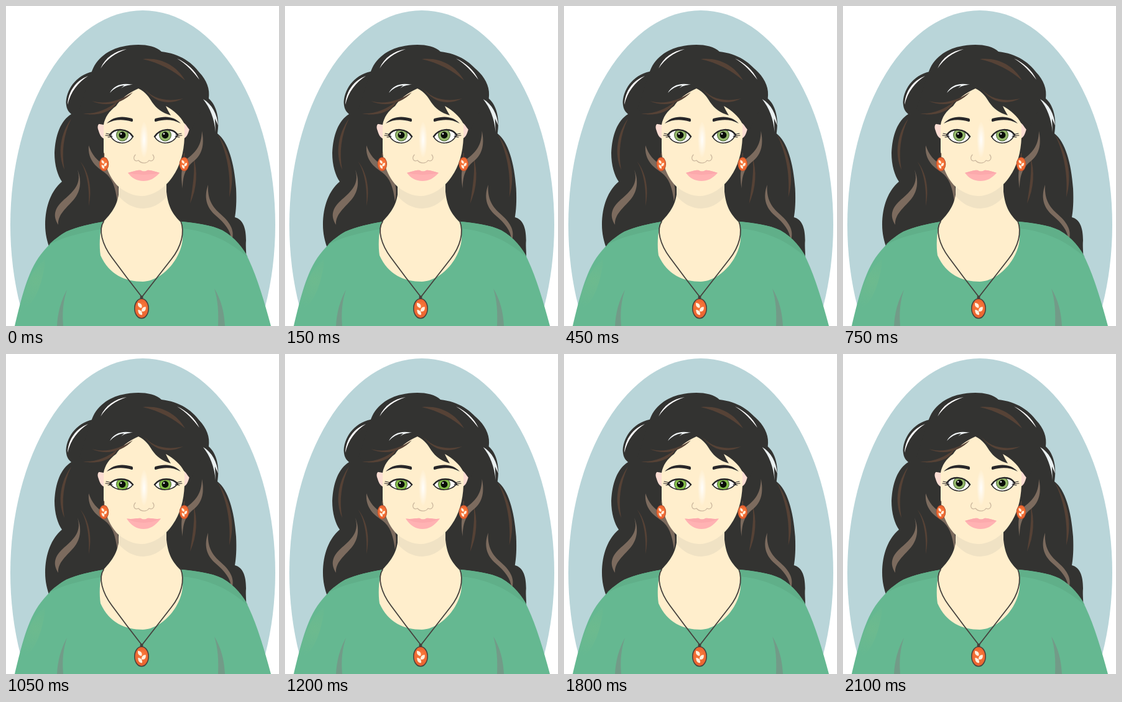
Write an HTML page with a canvas that moves like this. It is 439 px wide and 512 px high and loops after 2.4 s.

```html
<!DOCTYPE html>
<html lang="en">
<head>
<meta charset="utf-8">
<title>Portrait</title>
<style>
html, body { margin: 0; width: 100%; height: 100%; overflow: hidden; background: #fff; }
canvas { display: block; }
</style>
</head>
<body>
<canvas id="stage" width="439" height="512"></canvas>
<script>
const ctx = document.getElementById('stage').getContext('2d');
const LOOP = 2400;
const HAIR = '#333331', BROWN = '#564236', TAN = '#7c6b5e', SKIN = '#ffeecc', INK = '#282729';

const fill = (d, color) => {
  ctx.fillStyle = color;
  ctx.fill(new Path2D(d));
};
const line = (d, color, width) => {
  ctx.strokeStyle = color;
  ctx.lineWidth = width;
  ctx.lineCap = ctx.lineJoin = 'round';
  ctx.stroke(new Path2D(d));
};
const oval = (x, y, rx, ry, color) => {
  ctx.beginPath();
  ctx.ellipse(x, y, rx, ry, 0, 0, Math.PI * 2);
  ctx.fillStyle = color;
  ctx.fill();
};
const shifted = (dx, draw) => {
  ctx.save();
  ctx.translate(dx, 0);
  draw();
  ctx.restore();
};
const bothSides = draw => {
  draw(1);
  ctx.save();
  ctx.translate(443, 0);
  ctx.scale(-1, 1);
  draw(-1);
  ctx.restore();
};

function hairLeft() {
  fill('M144 104C117 108 98 129 96.500 154C97 163 99 168 105 173C88 183 79 207 78 235C78 255 83 271 90 281C73 295 63 320 63 350C63 364 66 377 71 390L190 390V110Z', HAIR);
  fill('M105 180C88 203 82 236 94 262C89 235 92 207 105 180Z', BROWN);
  fill('M119 248C129 262 135 290 133 320C139 294 134 266 119 248Z', BROWN);
  fill('M115 262C123 287 105 299 91 312C78 324 75 336 84 350C83 335 95 325 106 313C121 298 122 279 115 262Z', TAN);
  fill('M133 223C131 247 146 258 158 266C171 275 176 290 179 313C184 288 177 268 161 257C146 247 138 238 133 223Z', TAN);
}

function hairRight() {
  fill('M262 80C302 89 331 118 326 148C339 159 344 182 340 204C357 217 367 250 370 292C371 313 370 327 368 338C380 341 386 353 386 375C385 386 387 396 386 404L250 390V85Z', HAIR);
  fill('M341 206C355 235 362 268 359 306C370 270 360 234 341 206Z', BROWN);
  fill('M301 240C305 262 300 290 296 316C307 292 309 264 301 240Z', BROWN);
  fill('M325 286C318 306 322 322 337 335C352 348 361 358 363 376C369 358 359 345 344 332C328 318 324 304 325 286Z', TAN);
  fill('M315 200C315 222 305 234 293 243C283 251 280 266 284 292C284 270 290 258 301 249C317 237 319 219 315 200Z', TAN);
}

function shirt() {
  fill('M14 512C22 480 32 432 52 403C64 386 79 371 97 361C115 353 135 349 157 345H281C302 347 330 350 348 359C368 370 382 388 390 405C405 437 416 475 426 512Z', '#65b891');
  fill('M157 345C135 349 115 353 97 361C86 367 76 375 69 382C97 367 132 361 153 357Z', '#60af89');
  fill('M283 345C304 347 330 350 348 359C368 370 382 388 389 402C358 376 328 361 284 356Z', '#60af89');
  const glow = ctx.createRadialGradient(48, 440, 3, 48, 440, 45);
  glow.addColorStop(0, 'rgba(122,190,138,.35)');
  glow.addColorStop(1, 'rgba(122,190,138,0)');
  fill('M63 405C40 422 27 455 22 490C45 480 60 445 63 405Z', glow);
  fill('M98 454C88 472 83 492 82 512H92C90 490 92 472 98 454Z', '#729b88');
  fill('M335 452C346 470 351 490 352 512H341C342 490 341 472 335 452Z', '#729b88');
}

function gem(x, y, rx, ry) {
  const g = ctx.createRadialGradient(x + 1, y - ry * .3, 1, x, y, ry);
  g.addColorStop(0, '#f9783a');
  g.addColorStop(1, '#e8622f');
  oval(x, y, rx, ry, g);
  ctx.save();
  ctx.translate(x, y);
  ctx.scale(rx / 11, ry / 16);
  fill('M-6 -10C-1 -9 2 -6 0 -1C-5 -2 -7 -5 -6 -10ZM7 -3C8 3 5 6 0 5C0 0 2 -3 7 -3ZM-6 2C-1 2 2 6 1 11C-4 11 -6 7 -6 2Z', '#fff0df');
  ctx.restore();
}

function necklace() {
  line('M157 345C148 358 155 382 170 402C184 421 203 446 218 465', '#45413d', 1.8);
  line('M281 344C288 362 282 385 266 405C251 424 234 446 219 465', '#45413d', 1.8);
  oval(218, 466, 2.5, 2.5, '#45413d');
  oval(218, 484, 12, 16.5, '#45413d');
  gem(218, 484, 10.500, 15);
}

function neck() {
  fill('M182 280C183 312 176 325 155 347C150 365 150 385 152 399C166 430 192 441 220 441C253 440 286 400 284 366C284 356 283 350 281 346C264 329 258 315 257 280Z', SKIN);
  fill('M181 285V304C192 317 206 324 221 324C237 323 249 316 258 305V285Z', '#f0e2c4');
}

function face() {
  bothSides(() => fill('M160 187C149 185 145 191 149 200C151 207 154 212 160 213Z', '#fbdcd2'));
  fill('M157 165V232C158 257 170 282 186 293C200 302 210 304 220 304C237 303 256 291 268 273C280 256 286 235 287 210V150L214 125Z', SKIN);
}

function cap() {
  fill('M137 108C144 83 167 69 187 65C207 60 237 60 250 73C278 76 302 90 315 113C325 130 326 147 322 152L297 200C292 195 290 190 286 187C281 177 270 167 257 160C259 165 262 170 265 175C251 171 242 164 235 154C230 146 225 138 213 132C197 139 184 149 177 160C166 168 159 178 157 190L145 188L118 165Z', HAIR);
  fill('M138 152C158 158 181 153 204 138C187 157 160 162 138 152Z', BROWN);
  fill('M124 172C146 173 163 165 179 153C171 169 149 177 124 172Z', BROWN);
  fill('M220 85C249 82 274 95 288 119C269 103 247 91 220 85Z', BROWN);
  fill('M220 129C234 149 258 154 285 148C262 159 238 156 220 129Z', BROWN);
  fill('M152 100C160 82 175 72 194 69C176 75 163 84 152 100Z', '#fff');
  fill('M275 84C291 91 304 103 311 118C301 105 290 93 275 84Z', '#fff');
  fill('M167 139C173 127 187 122 204 126C196 126 189 128 184 133L190 127C180 128 174 132 167 139Z', '#f2f7f8');
}

function shine(sway) {
  shifted(-2 * sway, () => fill('M99 158C100 136 113 119 132 112C116 122 104 137 99 158Z', '#fff'));
  shifted(1.7 * sway, () =>
    fill('M317 149C331 157 340 173 341 191L336 180L337 202C335 180 328 163 317 149Z', '#e9f0f1'));
}

function brow() {
  fill('M162 188C172 177 186 175 203 180C205 182 204 186 202 185C188 181 175 181 162 188Z', INK);
}

// mode: 0 open, 1 smiling, 2 shut
function eye(mode, side) {
  if (mode === 2) {
    line('M165 207C177 216 193 217 204 210', INK, 2.2);
    line('M168 209L160 209M171 211L163 213M175 213L169 217', INK, 1.2);
    return;
  }
  const smile = mode === 1;
  const lid = smile ? 'M167 208C175 198 195 197 204 209' : 'M167 206C175 195 195 195 204 209';
  const shape = lid + (smile ? 'C197 220 177 220 167 208Z' : 'C197 223 175 223 167 206Z');
  fill(shape, '#fff');
  ctx.save();
  ctx.clip(new Path2D(shape));
  const y = smile ? 208.5 : 206.5;
  oval(187, y, 10, 10, '#4c6536');
  oval(187, y, 9, 9, smile ? '#83bd49' : '#94b86b');
  oval(187, y, 5.4, 5.4, '#090d08');
  oval(187 - 2 * side, y - 2, 1.300, 1.300, '#fff');
  ctx.restore();
  line(shape, INK, 1.5);
  line(lid, INK, 2.5);
  line('M170 206L161 204M170 208L160 207M171 209L164 210', INK, 1.1);
}

function nose() {
  ctx.save();
  ctx.translate(222, 214);
  ctx.scale(1, 4.2);
  const g = ctx.createRadialGradient(0, 0, 0, 0, 0, 7);
  g.addColorStop(0, 'rgba(255,255,255,.95)');
  g.addColorStop(1, 'rgba(255,255,255,0)');
  oval(0, 0, 7, 7, g);
  ctx.restore();
  line('M208 238C203 244 207 250 213 247C217 252 226 253 230 247C237 250 240 243 236 238', '#cdb99f', 1.3);
}

function mouth(smile) {
  const x = smile ? 194 : 196, y = smile ? 263.5 : 267;
  const top = `M${x} ${y}C205 265 212 262 217 263C220 265 224 265 227 263C233 262 239 265 ${443 - x} ${y}`;
  fill(`${top}C239 276 231 280 221 280C210 280 202 275 ${x} ${y}Z`, '#ffb2b3');
  fill(`${top}C236 270 228 269 221 270C213 269 207 270 ${x} ${y}Z`, '#fca9ac');
}

function earring(x) {
  line(`M${x} 236V244`, '#5b463a', 1.4);
  oval(x, 253, 7.800, 11.300, '#a84c30');
  gem(x, 253, 7, 10.500);
}

function draw(t) {
  // Hair swings out in three held steps.
  const step = Math.floor(t / 150);
  const sway = step < 4 ? [0, 1, 2, 1][step]
    : step === 8 || step === 12 ? 1
    : step > 8 && step < 12 ? 2 : 0;
  const smile = t >= 1050 && t < 2100;
  const eyes = smile ? 1 : step === 4 ? 2 : 0;

  ctx.fillStyle = '#fff';
  ctx.fillRect(0, 0, 439, 512);
  oval(220, 350, 213, 343, '#b9d5d9');
  shifted(-2 * sway, hairLeft);
  shifted(1.7 * sway, hairRight);
  fill('M183 120H257V345H183Z', HAIR);
  shirt();
  neck();
  necklace();
  face();
  cap();
  shine(sway);
  bothSides(side => {
    brow();
    eye(eyes, side);
  });
  nose();
  mouth(smile);
  earring(157.5 - 1.2 * sway);
  earring(286.5 + .8 * sway);
}

const start = performance.now();
function tick() {
  draw((performance.now() - start) % LOOP);
  requestAnimationFrame(tick);
}
tick();
</script>
</body>
</html>
```
